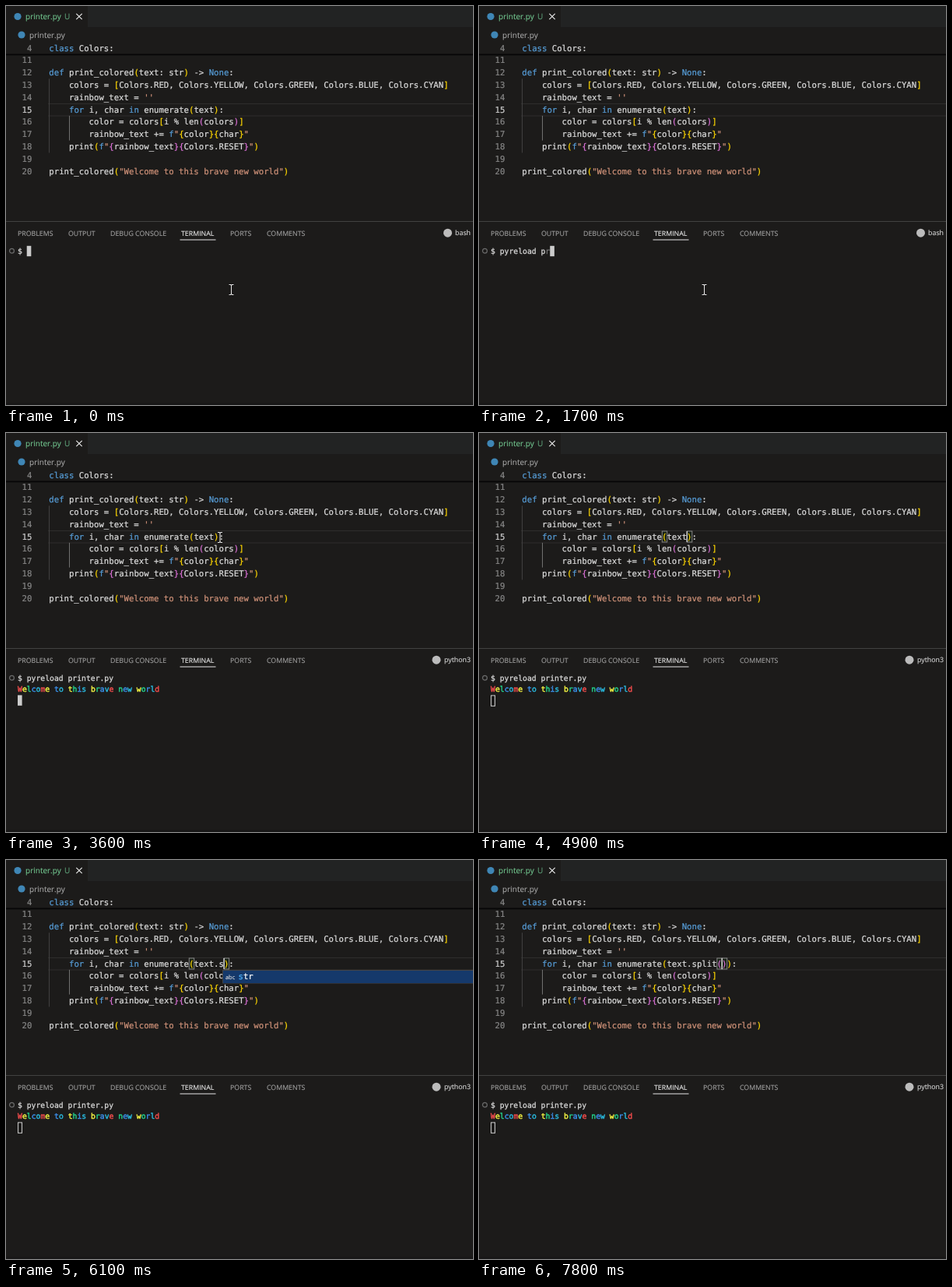
Animation, 600 px wide and 512 px high, one loop 8000 ms. Source, as an HTML page:

```html
<!DOCTYPE html>
<html lang="en">
<head>
<meta charset="utf-8">
<title>Editor and terminal</title>
<style>
html, body { margin: 0; width: 100%; height: 100%; overflow: hidden; background: #1c1b1a; }
svg { display: block; width: 600px; height: 512px; }
text { white-space: pre; text-rendering: geometricPrecision; color: #dcdcdc; }
text, tspan { fill: currentColor; stroke: currentColor; }
.code { font: 10.665px "DejaVu Sans Mono", monospace; stroke-width: .22; }
.term { font: 9.74px "DejaVu Sans Mono", monospace; stroke-width: .25; }
.output { stroke-width: .45; }
.ui { font: 10px "Open Sans", "Noto Sans", sans-serif; stroke-width: .1; }
.small { font: 8.8px "Open Sans", "Noto Sans", sans-serif; stroke-width: .12; }
.match rect { fill: #0064001a; stroke: #888; }
.word rect { fill: #575757b8; }
</style>
</head>
<body>
<svg id="stage" viewBox="0 0 600 512"></svg>
<script>
const LOOP = 8000;
const CELL = 6.42, LEFT = 55.3;     // editor grid
const TCELL = 5.864, TLEFT = 15;    // terminal grid
const stage = document.getElementById('stage');

function add(tag, attrs, parent = stage, content) {
  const el = document.createElementNS('http://www.w3.org/2000/svg', tag);
  for (const k in attrs) el.setAttribute(k, attrs[k]);
  if (content !== undefined) el.textContent = content;
  return parent.appendChild(el);
}
const rect = (x, y, width, height, fill, parent) => add('rect', { x, y, width, height, fill }, parent);
const label = (cls, x, y, str, color = '#dcdcdc', parent = stage) =>
  add('text', { class: cls, x, y, style: 'color:' + color }, parent, str);
const span = (parent, str, color) => add('tspan', { style: 'color:' + color }, parent, str);
const group = cls => add('g', cls ? { class: cls } : {});
const show = (el, on) => { el.style.display = on ? '' : 'none'; };

const lineTop = n => 125 + (n - 15) * 15.85;
const baseline = n => lineTop(n) + 11.6;
const colX = c => LEFT + c * CELL;
const termY = row => 318 + row * 14.3;

const PLAIN = '#dcdcdc', BLUE = '#569cd6', STRING = '#ce9178', BRACKETS = ['#ffd700', '#da70d6'];
const TOKEN = /(\b(?:def|class|for|in|None)\b|f(?="))|("[^"{]*"|'[^']*'|")|([[({])|([\])}])/g;

// Fill a text element with coloured spans
function paint(el, src) {
  el.textContent = '';
  let pos = 0, depth = 0;
  for (const m of src.matchAll(TOKEN)) {
    span(el, src.slice(pos, m.index), PLAIN);
    const color = m[1] ? BLUE : m[2] ? STRING : BRACKETS[(m[3] ? depth++ : --depth) % 2];
    span(el, m[0], color);
    pos = m.index + m[0].length;
  }
  span(el, src.slice(pos), PLAIN);
}

function codeLine(n, src, y = baseline(n)) {
  const number = label('code', 33.4, y, n, n === 15 ? '#cccccc' : '#858585');
  number.setAttribute('text-anchor', 'end');
  const el = label('code', LEFT, y, '');
  paint(el, src);
  return el;
}

// Tab strip and breadcrumb
rect(0, 0, 600, 512, '#1c1b1a');
rect(105, 0, 495, 27, '#222323');
add('circle', { cx: 15, cy: 13.5, r: 4.6, fill: '#3f86b5' });
label('ui', 25, 17, 'printer.py', '#73c991');
label('ui', 75, 17, 'U', '#5d9f78');
add('path', { d: 'M90.3 9.8l7.4 7.4m0-7.4l-7.4 7.4', stroke: '#e4e4e4', 'stroke-width': 1.2 });
add('circle', { cx: 20, cy: 37, r: 4.6, fill: '#3f86b5' });
label('ui', 30, 40.7, 'printer.py', '#a9a9a9');

// Editor
rect(54, 125, 546, 1, '#2e2d2c');
rect(54, 140.5, 546, 1, '#2e2d2c');
rect(55, lineTop(13), 1, lineTop(19) - lineTop(13), '#404040');
rect(81, lineTop(16), 1, lineTop(18) - lineTop(16), '#707070');
const words = group('word');
rect(colX(18), lineTop(12) + 1, 4 * CELL, 14.5, '', words);
rect(colX(29), lineTop(15) + 1, 4 * CELL, 14.5, '', words);
const match = group('match');
const marks = [0, 1].map(() => rect(0, 126, CELL, 14, '', match));

codeLine(4, 'class Colors:', 57.8);
rect(0, 61.5, 600, 1.5, '#060606');
rect(0, 63, 600, 1, '#151514');
const HEAD = '    for i, char in enumerate(text';
const lines = [
  '',
  'def print_colored(text: str) -> None:',
  '    colors = [Colors.RED, Colors.YELLOW, Colors.GREEN, Colors.BLUE, Colors.CYAN]',
  "    rainbow_text = ''",
  HEAD + '):',
  '        color = colors[i % len(colors)]',
  '        rainbow_text += f"{color}{char}"',
  '    print(f"{rainbow_text}{Colors.RESET}")',
  '',
  'print_colored("Welcome to this brave new world")'
].map((src, i) => codeLine(11 + i, src));
const loopLine = lines[4];

// Completion list
const popup = group();
rect(278, 141, 322, 17.5, '#454545', popup);
rect(279, 142, 321, 16, '#15396b', popup);
label('small', 282, 153, 'abc', '#e0e0e0', popup).style.fontSize = '7.4px';
const item = label('code', 298.5, 153.4, '', '#fff', popup);
span(item, 's', '#4db5ff');
span(item, 'tr', '#fff');

const caret = rect(0, 126, 1.3, 14, '#d8d8d8');

// Panel
rect(0, 276, 600, 1, '#414141');
[[15, 'PROBLEMS'], [80, 'OUTPUT'], [134, 'DEBUG CONSOLE'], [225, 'TERMINAL'], [288, 'PORTS'], [335, 'COMMENTS']]
  .forEach(([x, str]) => label('small', x, 295.2, str, str === 'TERMINAL' ? '#efefef' : '#a2a2a2'));
rect(223.5, 299.5, 46, 1, '#e7e7e7');
const shellIcon = add('circle', { cy: 291.2, r: 5.5, fill: '#bcbcbc' });
const shell = label('small', 597, 294.3, '');
shell.setAttribute('text-anchor', 'end');
rect(0, 509.5, 600, 2.5, '#171717');

// Terminal
add('circle', { cx: 7.5, cy: 314.3, r: 2.9, fill: 'none', stroke: '#6c6c6c', 'stroke-width': 1.2 });
const prompt = label('term', TLEFT, termY(0), '');
const typedSpan = span(prompt, '', PLAIN);
const freshSpan = span(prompt, '', '#777');
const output = label('term output', TLEFT, termY(1), '');
const RAINBOW = ['#f14c4c', '#f5f543', '#23d18b', '#3b8eea', '#29b8db'];
[...'Welcome to this brave new world'].forEach((ch, i) => span(output, ch, RAINBOW[i % 5]));
const cursor = rect(0, 0, 5.6, 13.4, '#cccccc');

const mouse = group();
const beam = 'M-3 -6.5h2l1 1l1 -1h2M0 -5.5v11M-3 6.5h2l1 -1l1 1h2';
add('path', { d: beam, fill: 'none', stroke: '#000', 'stroke-width': 2.4, opacity: .5 }, mouse);
add('path', { d: beam, fill: 'none', stroke: '#e8e8e8', 'stroke-width': 1.1 }, mouse);

// Timeline
const COMMAND = 'pyreload printer.py ';
const KEYS = [[0, 0], [200, 1], [300, 2], [500, 3], [600, 4], [700, 5], [900, 6], [1000, 7], [1200, 8],
  [1300, 9], [1500, 10], [1700, 11], [1800, 12], [1900, 13], [2000, 20]];
const ENTER = 2100, RUN = 2300, CLICK = 4000, ARROW = 4900;
const EDITS = [[CLICK, ''], [ARROW, ''], [5600, '.'], [6000, '.s'], [6200, '.sp'], [6400, '.spl'],
  [6600, '.spli'], [6800, '.split'], [7700, '.split()']];
const latest = (list, t) => list.filter(e => e[0] <= t).pop();

function drawTerminal(t) {
  const [at, count] = latest(KEYS, t);
  const fresh = count > 0 && count < 20 && t < at + 100 ? 1 : 0;
  typedSpan.textContent = '$ ' + COMMAND.slice(0, count - fresh);
  freshSpan.textContent = COMMAND.slice(count - fresh, count);

  const running = t >= RUN, row = running ? 2 : t >= ENTER ? 1 : 0;
  show(output, running);
  shell.textContent = running ? 'python3' : 'bash';
  shellIcon.setAttribute('cx', running ? 553 : 567.5);

  const hollow = t >= CLICK, inset = hollow ? .5 : 0;
  cursor.setAttribute('x', TLEFT + inset + (row ? 0 : (2 + count) * TCELL));
  cursor.setAttribute('y', termY(row) - 10.2 + inset);
  cursor.setAttribute('fill', hollow ? 'none' : '#cccccc');
  cursor.setAttribute('stroke', hollow ? '#cccccc' : 'none');
  cursor.setAttribute('width', hollow ? 5 : 5.6);
}

function drawEditor(t) {
  const [at, tail] = latest(EDITS, t) || [0, ''];
  const focused = t >= CLICK, called = tail.endsWith(')');
  const src = HEAD + tail;
  if (loopLine.textContent !== src + '):') paint(loopLine, src + '):');

  const col = src.length - (called ? 1 : 0) + (at === CLICK ? 1 : 0);
  caret.setAttribute('x', colX(col) - .6);
  show(caret, focused && (t - at) % 1000 < 500);

  const pair = called ? [src.length - 2, src.length - 1] : [HEAD.length - 5, src.length];
  marks.forEach((m, i) => m.setAttribute('x', colX(pair[i]) + .2));
  show(match, focused);
  show(words, t >= 5200 && t < 5600);
  show(popup, t >= 6100 && t < 6200);
}

function drawMouse(t) {
  const p = Math.min(1, Math.max(0, (Math.floor(t / 100) * 100 - 3000) / 600));
  const e = p * p * (3 - 2 * p);
  mouse.setAttribute('transform', `translate(${289.5 - 14.5 * e} ${364 - 230 * e})`);
  show(mouse, t < ARROW);
}

function frame() {
  const t = performance.now() % LOOP;
  drawTerminal(t);
  drawEditor(t);
  drawMouse(t);
  requestAnimationFrame(frame);
}
frame();
</script>
</body>
</html>
```
